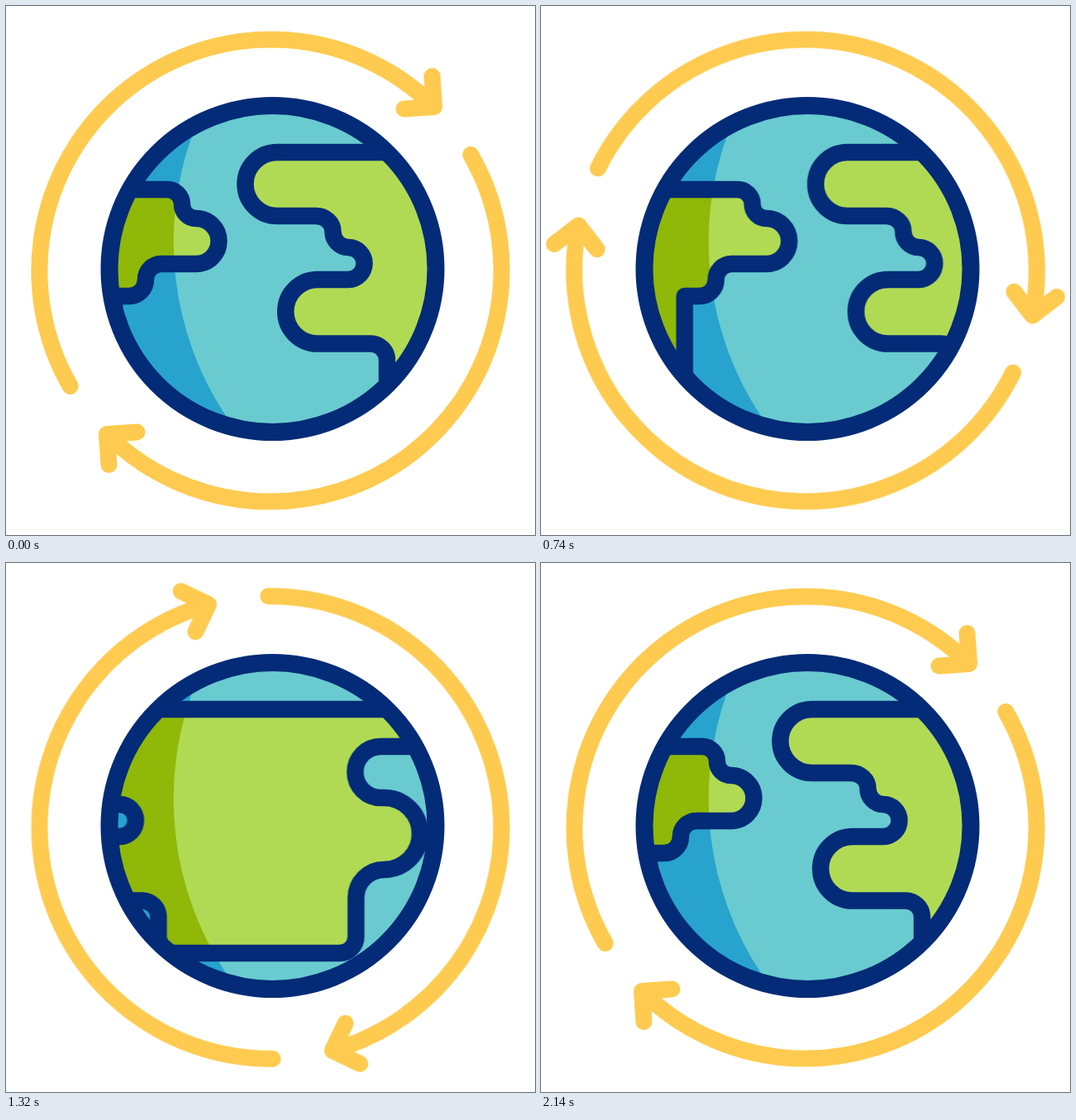
An HTML page without scripts for the animation above (2.4 s loop, 640 by 640 pixels).

```html
<!DOCTYPE html>
<html lang="en">
<head>
<meta charset="utf-8">
<title>Turning globe</title>
<style>
  html, body { margin: 0; width: 100%; height: 100%; overflow: hidden; background: #fff; }
  svg { display: block; width: 100%; height: 100%; }

  .orbit, .map { animation: 2400ms infinite; }
  .orbit { animation-name: orbit; transform-origin: 320px 320px; }
  .map { animation-name: map; }

  .orbit path { fill: none; stroke: #fecb50; stroke-width: 20; stroke-linecap: round; stroke-linejoin: round; }
  .land { fill: currentColor; stroke: #032b77; stroke-width: 20.5; stroke-linejoin: round; }
  .ring { fill: none; stroke: #032b77; stroke-width: 21; }
  .lit { color: #b1da54; }
  .dim { color: #90b808; }

  @keyframes orbit {
    0% { transform: rotate(0deg); animation-timing-function: cubic-bezier(.333, 0, .667, .227); }
    13.333% { transform: rotate(6.9deg); animation-timing-function: cubic-bezier(.333, .143, .667, .316); }
    30.833% { transform: rotate(56deg); animation-timing-function: cubic-bezier(.333, .216, .667, .587); }
    40.833% { transform: rotate(145.2deg); animation-timing-function: cubic-bezier(.333, .338, .667, .787); }
    55% { transform: rotate(299.2deg); animation-timing-function: cubic-bezier(.333, .631, .667, .848); }
    66.667% { transform: rotate(342.1deg); animation-timing-function: cubic-bezier(.333, .704, .667, 1); }
    89.167%, 100% { transform: rotate(360deg); }
  }

  /* pulls back to the left first, then runs one full map width to the right */
  @keyframes map {
    0% { transform: translateX(0); animation-timing-function: cubic-bezier(.333, 0, .667, .868); }
    13.333% { transform: translateX(-81px); animation-timing-function: cubic-bezier(.333, -.114, .667, .203); }
    30.833% { transform: translateX(42px); animation-timing-function: cubic-bezier(.333, .184, .667, .58); }
    40.833% { transform: translateX(347px); animation-timing-function: cubic-bezier(.333, .352, .667, .692); }
    55% { transform: translateX(862px); animation-timing-function: cubic-bezier(.333, .504, .667, .964); }
    66.667% { transform: translateX(1121px); animation-timing-function: cubic-bezier(.333, .947, .667, 1); }
    89.167%, 100% { transform: translateX(1140px); }
  }
</style>
</head>
<body>
<svg viewBox="0 0 640 640">
  <defs>
    <clipPath id="globe"><circle cx="322.5" cy="318" r="198"/></clipPath>
    <clipPath id="shade"><path d="M225 157 A382 382 0 0 0 266 496 V540 H100 V100 H225 Z"/></clipPath>

    <g id="lands" class="land">
      <path d="M28 222 H195 a18 18 0 0 1 18 18 a17 17 0 0 0 17 17 A27.5 27.5 0 0 1 230 312
        H188 a19 19 0 0 0 -19 19 a20 20 0 0 1 -20 20 H131 V580 H18 V366
        a19 19 0 0 1 19 -19 H38 a22 24 0 0 0 22 -24 V313 a32 32 0 0 0 -32 -32
        a20 20 0 0 1 -20 -20 V242 a20 20 0 0 1 20 -20 Z"/>
      <path d="M949.5 177 H328 A38.5 38.5 0 0 0 328 254 H375 a20.5 19 0 0 1 20.5 19
        a18.5 19 0 0 0 18.5 19 A19.5 19.5 0 0 1 414 331 H377 A38.75 38.75 0 0 0 377 408.5
        H441 a20 20 0 0 1 20 20 V452 a20 20 0 0 0 20 20 H680 a20 20 0 0 0 20 -20 V405
        a34 34 0 0 1 34 -34 A43.5 43.5 0 0 0 734 284 H730 A31 31 0 0 1 730 222
        H949.5 A22.5 22.5 0 0 0 949.5 177 Z"/>
    </g>
    <g id="world">
      <use href="#lands"/>
      <use href="#lands" x="-1140"/>
    </g>

    <path id="arrow" d="M562.3 180 A280 280 0 0 1 122 518 M124.5 555 L122 518 L158.5 515.5"/>
  </defs>

  <rect width="640" height="640" fill="#fff"/>

  <g clip-path="url(#globe)">
    <rect x="100" y="100" width="440" height="440" fill="#69cbd0"/>
    <g class="map lit"><use href="#world"/></g>
    <g clip-path="url(#shade)">
      <rect x="100" y="100" width="440" height="440" fill="#28a3ce"/>
      <g class="map dim"><use href="#world"/></g>
    </g>
  </g>
  <circle class="ring" cx="322.5" cy="318" r="197.5"/>

  <g class="orbit">
    <use href="#arrow"/>
    <use href="#arrow" transform="rotate(180 320 320)"/>
  </g>
</svg>
<style>
  #arrow { fill: none; stroke: #fecb50; stroke-width: 20; stroke-linecap: round; stroke-linejoin: round; }
</style>
</body>
</html>
```
